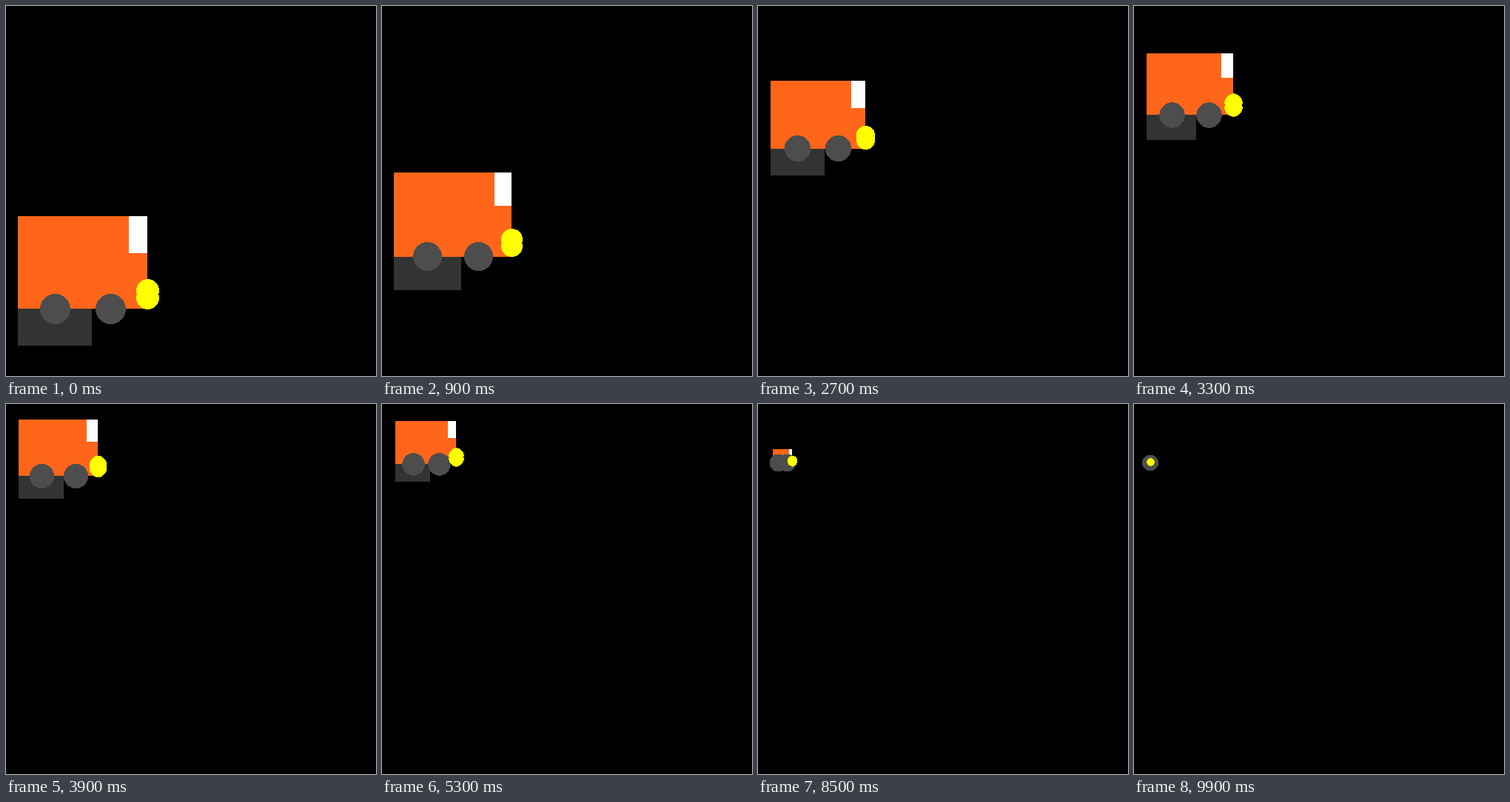
An HTML page that plays this animation: 500x500 px, repeating every 10 s.

```html
<!DOCTYPE html>
<html lang="en">
<head>
<meta charset="utf-8">
<title>Shrinking van</title>
<style>
  html, body { margin: 0; width: 100%; height: 100%; overflow: hidden; background: #000; }
  svg { display: block; width: 500px; height: 500px; }
</style>
</head>
<body>
<svg viewBox="0 0 500 500" shape-rendering="crispEdges">
  <rect width="500" height="500" fill="#000"/>
  <rect id="road" fill="#333"/>
  <rect id="body" fill="#ff661a"/>
  <rect id="pane" fill="#fff"/>
  <path id="rear" fill="#4d4d4d"/>
  <path id="front" fill="#4d4d4d"/>
  <path id="lampTop" fill="#ff0"/>
  <path id="lampLow" fill="#ff0"/>
</svg>
<script>
const STEP = 100, STEPS = 100;
const part = id => document.getElementById(id);

// Edges snap to whole pixels.
function setRect(id, x0, y0, x1, y1) {
  const left = Math.floor(x0), top = Math.round(y0);
  const box = { x: left, y: top, width: Math.floor(x1) - left, height: Math.round(y1) - top };
  for (const key in box) part(id).setAttribute(key, box[key]);
}

// Superellipse: power 2 is a circle, smaller powers lean towards a diamond.
function setDisc(id, x, y, r, power) {
  const cx = Math.floor(x) + 0.5, cy = Math.floor(y) + 0.5;
  const bend = v => Math.sign(v) * Math.abs(v) ** (2 / power) * r;
  const points = Array.from({ length: 48 }, (_, i) => {
    const a = i * Math.PI / 24;
    return (cx + bend(Math.cos(a))).toFixed(2) + ' ' + (cy + bend(Math.sin(a))).toFixed(2);
  });
  part(id).setAttribute('d', 'M' + points.join('L') + 'Z');
}

function draw(ms) {
  const k = Math.floor(ms / STEP) % STEPS;
  const s = 1 - k / STEPS;
  const climb = 5 * Math.min(65, Math.floor(k * 8 / 5));
  const left = 21 - 5 * s;
  const floor = 404 - climb + 5 * s;
  const x = u => left + u * s;
  const y = v => floor - v * s;

  setRect('road', left, floor, x(100), y(-50));
  setRect('body', left, y(125), x(175), floor);
  setRect('pane', x(150), y(125), x(175), y(75));

  const wheel = 10 * s + 10.5, lamp = 10 * s + 5.5;
  setDisc('rear', x(50), floor, wheel, 1.95);
  setDisc('front', x(125), floor, wheel, 1.95);
  const lampPower = 1.55 + 0.45 * s;
  setDisc('lampTop', x(175), y(25), lamp, lampPower);
  setDisc('lampLow', x(175), y(15), lamp, lampPower);
}

const start = performance.now();
function tick() {
  draw(performance.now() - start);
  requestAnimationFrame(tick);
}
tick();
</script>
</body>
</html>
```
